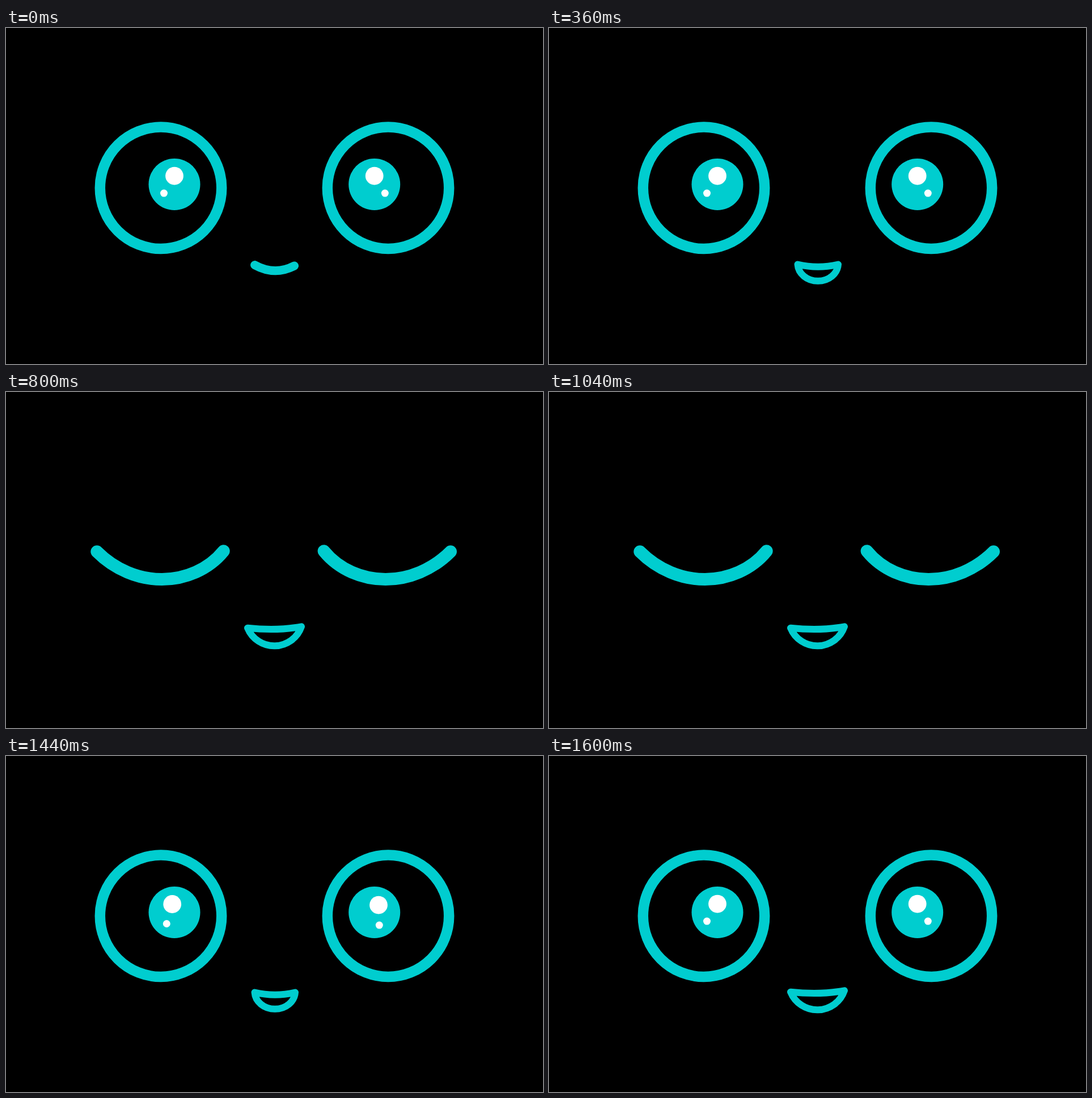
Animation, 947 px wide and 592 px high, one loop 1920 ms. Source, as an HTML page:

```html
<!DOCTYPE html>
<html lang="en">
<head>
<meta charset="utf-8">
<title>Blinking face</title>
<style>
  html, body { margin: 0; width: 100%; height: 100%; overflow: hidden; background: #000; }
  svg { display: block; width: 100%; height: 100%; }
  .line { fill: none; stroke: #00cdcf; stroke-linecap: round; stroke-linejoin: round; }
  .pupil { fill: #00cdcf; }
  .shine { fill: #fff; }
</style>
</head>
<body>
<svg viewBox="0 0 947 592">
  <g id="open">
    <g class="line" stroke-width="18.5">
      <circle cx="273" cy="281.8" r="107.2"/>
      <circle cx="674" cy="281.8" r="107.2"/>
    </g>
    <circle class="pupil" cx="297" cy="275.5" r="45.5"/>
    <circle class="pupil" cx="649.7" cy="275.5" r="45.5"/>
    <g class="shine">
      <circle id="bigLeft" r="15.9"/>
      <circle id="smallLeft" r="6.5"/>
      <circle id="bigRight" r="15.9"/>
      <circle id="smallRight" r="6.5"/>
    </g>
  </g>
  <g id="closed" class="line" stroke-width="22">
    <path id="lid" d="M160.3 281.2C192 313 234 330 275 330S357 313 383.7 280.3"/>
    <use href="#lid" transform="translate(944.3) scale(-1 1)"/>
  </g>
  <path id="mouth" class="line"/>
</svg>
<script>
const MOUTHS = {
  smile: { d: 'M438.6 417.6Q474 437 508.5 419', width: 15 },
  small: { d: 'M438.5 416.5Q474.5 425 510 416.5A35.8 31 0 0 1 438.5 416.5Z', width: 12 },
  wide: { d: 'M426 415.7Q478 421.5 521 413.3A50.8 50.8 0 0 1 426 415.7Z', width: 12 }
};
const STEADY = { bigLeft: [297, 260.6], smallLeft: [278.5, 291.1], bigRight: [649.7, 260.6], smallRight: [668.3, 291.1] };
const SHIFTED = { bigLeft: [293.2, 261], smallLeft: [283.3, 295.5], bigRight: [657, 262.6], smallRight: [658.3, 298.1] };

// Each pose holds until its end time; shines are absent while the eyes are shut.
const POSES = [
  { end: 360, mouth: MOUTHS.smile, shines: STEADY },
  { end: 800, mouth: MOUTHS.small, shines: STEADY },
  { end: 1200, mouth: MOUTHS.wide },
  { end: 1600, mouth: MOUTHS.small, shines: SHIFTED },
  { end: 1920, mouth: MOUTHS.wide, shines: STEADY }
];
const LOOP = 1920;
const part = id => document.getElementById(id);
const show = (id, visible) => part(id).setAttribute('visibility', visible ? 'visible' : 'hidden');

function draw({ mouth, shines }) {
  part('mouth').setAttribute('d', mouth.d);
  part('mouth').setAttribute('stroke-width', mouth.width);
  show('open', shines);
  show('closed', !shines);
  for (const [id, [x, y]] of Object.entries(shines || {})) {
    part(id).setAttribute('cx', x);
    part(id).setAttribute('cy', y);
  }
}

function tick() {
  const time = performance.now() % LOOP;
  draw(POSES.find(pose => time < pose.end));
  requestAnimationFrame(tick);
}
tick();
</script>
</body>
</html>
```
